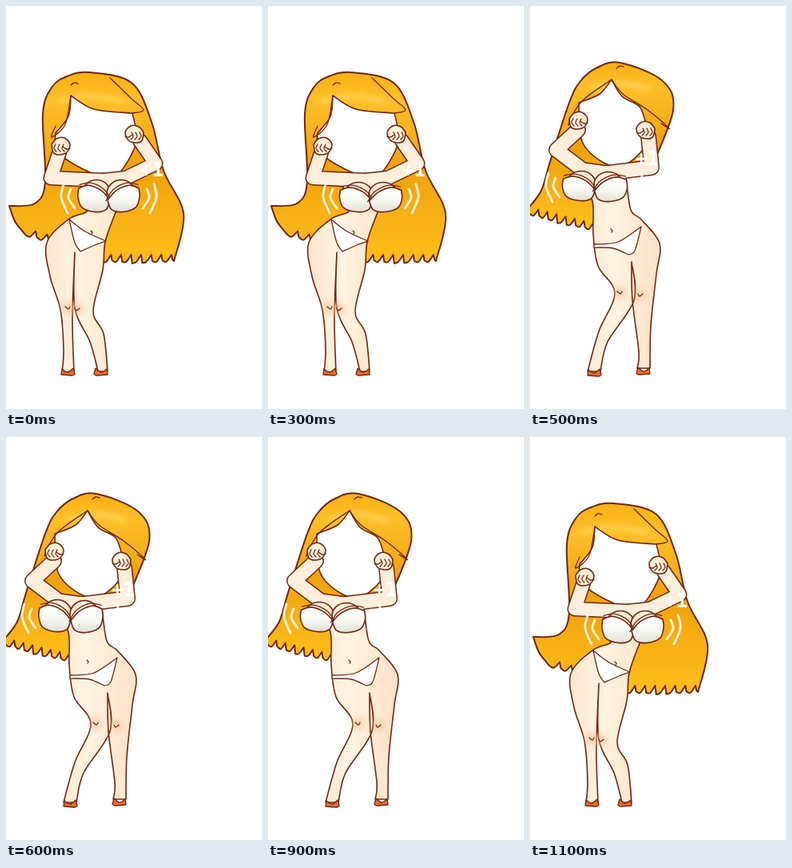
These frames come from a looping animation (320x504 px, 1.2 s). An HTML page:

```html
<!DOCTYPE html>
<html lang="en">
<head>
<meta charset="utf-8">
<title>Dance loop</title>
<style>
  html, body { margin: 0; width: 100%; height: 100%; overflow: hidden; background: #fff; }
  svg { display: block; width: 320px; height: 504px; }
  #stage { stroke: #6e2612; stroke-width: 1.6; stroke-linecap: round; stroke-linejoin: round; }
  .hair { fill: url(#gold); stroke-width: 2; }
  .face { fill: #fff; }
  .skin { fill: url(#peach); }
  .sleeve { fill: none; }
  .flesh { fill: none; stroke: #ffeedb; }
  .cup { fill: url(#cloth); }
  .brief { fill: #fff; stroke-width: 1.3; }
  .line { fill: none; stroke-width: 1.3; }
  .shoe { fill: #ef6a2c; stroke-width: 1.3; }
  .shine { fill: none; stroke: #ffdf73; stroke-width: 5; opacity: .65; filter: url(#soft); }
  .blush { fill: #f9b78a; stroke: none; opacity: .4; filter: url(#soft); }
  .swing { fill: none; stroke: #fff; stroke-width: 3; opacity: .8; }
  text { font: bold 24px "DejaVu Sans Mono", monospace; fill: #fff; stroke: none; }
</style>
</head>
<body>
<svg viewBox="0 0 320 504">
  <defs>
    <linearGradient id="gold" x1="0" y1="0" x2="0" y2="1">
      <stop offset="0" stop-color="#f9b012"/><stop offset=".15" stop-color="#ffbf2a"/>
      <stop offset=".5" stop-color="#eea20d"/><stop offset="1" stop-color="#ffbf1c"/>
    </linearGradient>
    <linearGradient id="peach" x1="0" y1="0" x2="1" y2="0">
      <stop offset="0" stop-color="#fee6cf"/><stop offset=".4" stop-color="#fff3e0"/>
      <stop offset="1" stop-color="#fee1c6"/>
    </linearGradient>
    <linearGradient id="cloth" x1="0" y1="0" x2="0" y2="1">
      <stop offset="0" stop-color="#fff"/><stop offset=".55" stop-color="#f7f7f2"/>
      <stop offset="1" stop-color="#dedfd5"/>
    </linearGradient>
    <filter id="soft" x="-50%" y="-100%" width="200%" height="300%"><feGaussianBlur stdDeviation="3"/></filter>
  </defs>
  <g id="stage"></g>
</svg>
<script>
// Key points are joined by smooth curves; "|" marks a corner.
const poses = {
  left: {
    hair: "20,281 11,269 4,250 | 36,247 49,220 46,135 57,102 76,88 105,83 157,96 182,145 197,206 222,260 210,319",
    hems: ["208,317 120,317", "53,292 24,284"],
    face: "81,112 | 110,129 158,134 | 163,170 142,209 126,216 85,198 63,180 62,159 | 78,138 81,112",
    locks: ["130,90 157,116 172,130 158,134", "81,112 74,148 57,164 62,150"],
    crown: "85,99", shine: "67,119 105,112 144,119",
    arms: ["67,182 56,215 122,218", "167,168 187,197 150,215 122,218"], armWidth: 16,
    body: "94,220 95,245 101,257 78,267 51,296 55,338 68,380 72,430 70,458 | 85,458 | 83,390 86,308 | 86,378 105,420 115,457 | 127,457 | 122,410 109,382 121,330 124,295 137,258 152,222",
    brief: "79,267 | 99,282 125,294 | 111,299 93,307 | 86,296 79,267",
    cups: "111,239 146,239", navel: "107,283", knees: "77,377 89,379", shoes: "77,455 119,455",
    fists: "68,176 161,161", label: "168,213"
  },
  centre: {
    hair: "5,244 | 28,215 37,150 42,73 62,50 96,41 157,64 172,128 163,210 180,258",
    hems: ["178,257 128,264", "80,266 14,246"],
    face: "88,64 | 105,85 140,96 | 154,108 144,141 99,178 62,150 56,103 | 77,86 88,64",
    locks: ["132,94 150,100 172,103 158,95", "88,64 76,89 47,104 54,97"],
    crown: "97,50", shine: "58,71 104,75 149,67",
    arms: ["71,117 46,145 78,190 99,189", "140,119 152,163 123,191 99,189"], armWidth: 19,
    body: "76,200 75,222 88,256 64,296 58,360 70,415 68,457 | 85,458 | 85,400 82,365 102,294 | 85,360 107,394 134,457 | 149,456 | 141,413 114,363 141,318 134,270 124,253 129,200",
    brief: "76,268 | 105,273 134,260 | 123,282 103,294 | 89,283 76,268",
    cups: "82,221 122,221", navel: "103,260", knees: "68,362 96,367", shoes: "76,455 141,454",
    palms: "68,117 141,118", label: "138,190"
  },
  right: {
    hair: "-4,255 | 14,231 25,195 49,121 63,94 84,77 113,71 165,93 179,130 151,204 | 85,220",
    hems: ["80,278 0,258"],
    face: "102,92 | 115,113 137,126 145,148 | 143,176 118,199 92,196 65,169 61,121 | 87,110 102,92",
    locks: ["102,92 116,110 147,130 174,153 164,147", "102,92 65,119 48,148 58,140"],
    crown: "112,78", shine: "78,103 112,96 148,104",
    arms: ["60,155 33,180 66,205 95,209", "148,163 152,202 95,209"], armWidth: 17,
    body: "61,210 78,244 79,285 85,325 106,359 86,407 72,457 | 88,457 | 97,420 130,368 127,320 | 128,368 136,432 134,453 | 150,453 | 151,400 158,335 162,297 139,267 126,255 120,214",
    brief: "80,298 | 110,295 139,276 | 131,306 123,311 | 104,303 80,302 | 80,298",
    cups: "62,225 100,226", navel: "102,281", knees: "112,358 138,361", shoes: "80,456 142,454",
    fists: "60,144 145,156", label: "132,199"
  }
};

// One entry per step: pose and how flat the chest is pressed.
const STEP = 100;
const bounce = pose => [0, .5, 1, .5].map(flat => [pose, flat]);
const beats = [
  ...bounce("left"), ["centre", 0], ["right", .5],
  ...bounce("right"), ["centre", 0], ["left", 0]
];

const points = s => s.trim().split(/\s+/).map(p => p.split(",").map(Number));
const parse = s => s.split("|").map(points);

function outline(runs) {
  let d = "M" + runs[0][0];
  let last = null;
  for (const run of runs) {
    const pts = last ? [last, ...run] : run;
    for (let i = 0; i + 1 < pts.length; i++) {
      const a = pts[i - 1] || pts[i], b = pts[i], c = pts[i + 1], e = pts[i + 2] || c;
      const c1 = b.map((v, n) => v + (c[n] - a[n]) / 6);
      const c2 = c.map((v, n) => v - (e[n] - b[n]) / 6);
      d += `C${c1} ${c2} ${c}`;
    }
    last = pts[pts.length - 1];
  }
  return d;
}

const path = (cls, d, extra = "") => `<path class="${cls}" d="${d}" ${extra}/>`;
const shape = (cls, s) => path(cls, outline(parse(s)));
const oval = (cls, x, y, rx, ry) => `<ellipse class="${cls}" cx="${x}" cy="${y}" rx="${rx}" ry="${ry}"/>`;

// Draws a small shape around a point; side -1 mirrors it.
const placed = (cls, s, [x, y], side = 1, sx = 1, sy = 1) =>
  path(cls, outline(parse(s).map(run => run.map(([u, v]) => [x + u * side * sx, y + v * sy]))));
const pair = (s, draw) => s ? points(s).map((p, i) => draw(p, i ? -1 : 1)).join("") : "";

// Torn edge: sharp locks hanging between two points.
function hem(s) {
  const [[x1, y1], [x2, y2]] = points(s);
  const teeth = Math.round(Math.abs(x2 - x1) / 12);
  const runs = [[[x1, y1]]];
  for (let i = 1; i <= teeth; i++) {
    const at = (k, drop) => [x1 + (x2 - x1) * k / teeth, y1 + (y2 - y1) * k / teeth + drop];
    runs.push([at(i - .9, -6)], [at(i - .4, 3), at(i, 3 + 2 * Math.sin(i * 5))]);
  }
  return runs;
}

const hair = p => path("hair", outline([...parse(p.hair), ...p.hems.flatMap(hem)]) + "Z");

const arms = (p, cls, width) =>
  p.arms.map(s => path(cls, "M" + s.replace(/ /g, "L"), `style="stroke-width:${width}"`)).join("");

const fist = (at, side) =>
  placed("skin", "-11,-3 -5,-10 5,-11 12,-3 8,7 -2,10 -9,7 -11,-3", at, side)
  + [-6, -1, 4].map(x => placed("line", "0,-3 -2,2 1,6", [at[0] + x * side, at[1]], side)).join("")
  + placed("line", "3,0 8,3 12,2", at, side);

const palm = (at, side) =>
  placed("skin", "-5,4 -13,-12 -14,-27 | -9,-24 | -12,-35 -8,-36 1,-22 | 8,-28 10,-14 4,4", at, side)
  + [-13, -6, 1].map((x, i) => placed("line", "0,0 4,7 6,15", [at[0] + x * side, at[1] - 29 + i * 4], side)).join("");

function chest(p, flat) {
  const wide = 20 + flat, tall = 18.5 - 3 * flat, drop = 3 * flat;
  const low = ([x, y]) => [x, y + drop];
  const skin = pair(p.cups, ([x, y], side) => oval("skin", x + 2 * side, y - 4 + drop, 18, tall - 1));
  const cups = pair(p.cups, (at, side) =>
    placed("cup", "-1,-.6 | -.4,-.8 .4,-.45 .95,.2 | .7,.85 0,1 -.8,.7 -1.05,0 -1,-.6", low(at), side, wide, tall)
    + placed("line", "-.95,-.85 -.2,-.95 .6,-.5 1.05,.25", low(at), side, wide, tall));
  return skin + cups;
}

const swings = p => pair(p.cups, ([x, y], side) => [0, 1].map(k =>
  placed("swing", "3,-1 0,-.1 8,1", [x - (33 + 9 * k) * side, y + 2], side, 1, 12 + 6 * k)).join(""));

function figure(p, flat) {
  const [x, y] = points(p.label)[0];
  return hair(p) + shape("shine", p.shine) + shape("face", p.face)
    + p.locks.map(s => shape("line", s)).join("") + placed("line", "-4,0 0,-3 5,-2", points(p.crown)[0])
    + arms(p, "sleeve", p.armWidth + 3) + shape("skin", p.body) + arms(p, "flesh", p.armWidth)
    + pair(p.knees, ([kx, ky]) => oval("blush", kx, ky, 9, 9))
    + pair(p.knees, (at, side) => placed("line", "-3,-1 1,2 3,-1", at, side))
    + shape("brief", p.brief) + placed("line", "-1,-2 1,0 0,2", points(p.navel)[0])
    + pair(p.shoes, (at, side) => placed("shoe", "-7,-1 | 0,3 7,-2 | 9,5 | 6,7 -8,6 | -7,-1", at, side))
    + pair(p.fists, fist) + pair(p.palms, palm)
    + chest(p, flat) + swings(p) + `<text x="${x}" y="${y}">+1</text>`;
}

const stage = document.getElementById("stage");
const start = performance.now();
let shown = -1;

function render(now) {
  const beat = Math.floor(Math.max(0, now - start) / STEP) % beats.length;
  if (beat !== shown) {
    const [pose, flat] = beats[beat];
    stage.innerHTML = figure(poses[pose], flat);
    shown = beat;
  }
  requestAnimationFrame(render);
}
render(start);
</script>
</body>
</html>
```
